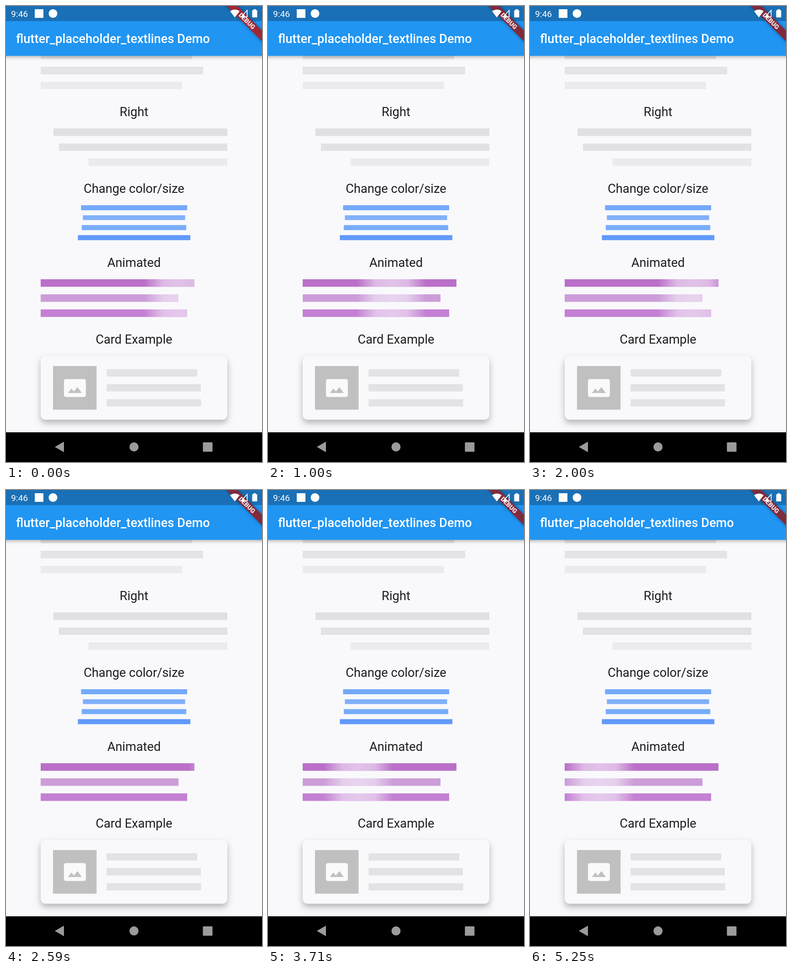
Write an HTML page with a canvas that moves like this. It is 561 by 998 pixels and loops after 5.29 s.

```html
<!DOCTYPE html>
<html lang="en">
<head>
<meta charset="utf-8">
<title>Placeholder lines demo</title>
<style>
html, body { margin: 0; width: 100%; height: 100%; overflow: hidden; background: #f9f9fc; }
canvas { display: block; }
</style>
</head>
<body>
<canvas id="stage" width="561" height="998"></canvas>
<script>
const ctx = document.getElementById('stage').getContext('2d');
const W = 561, H = 998, LOOP = 5290, FIRST = 90, STEP = 40;
const SWING = 2010, TURN = 1395;
const FONT = 'Roboto, sans-serif';

function bar(x1, x2, y1, y2, color) {
  ctx.fillStyle = color;
  ctx.fillRect(x1, y1, x2 - x1, y2 - y1);
}

function label(text, x, y, size, weight, color, align = 'left') {
  ctx.font = `${weight} ${size}px ${FONT}`;
  ctx.textAlign = align;
  ctx.textBaseline = 'alphabetic';
  ctx.fillStyle = color;
  ctx.fillText(text, x, y);
}

function heading(text, y) {
  label(text, 280.5, y, 27.3, 400, '#1e1e20', 'center');
}

function poly(color, ...points) {
  ctx.fillStyle = color;
  ctx.beginPath();
  points.forEach(([x, y]) => ctx.lineTo(x, y));
  ctx.closePath();
  ctx.fill();
}

function disc(x, y, r, color) {
  ctx.fillStyle = color;
  ctx.beginPath();
  ctx.arc(x, y, r, 0, 2 * Math.PI);
  ctx.fill();
}

function roundBox(x, y, w, h, r, color) {
  ctx.fillStyle = color;
  ctx.beginPath();
  ctx.roundRect(x, y, w, h, r);
  ctx.fill();
}

function shadow(color, blur, dy) {
  ctx.shadowColor = color;
  ctx.shadowBlur = blur;
  ctx.shadowOffsetY = dy;
}

// The highlight swings left and right with a sine ease.
function glowCenter(t) {
  const s = (1 - Math.cos(2 * Math.PI * (t - TURN) / SWING)) / 2;
  return 129 + 372 * s;
}

function lists() {
  bar(76, 407.5, 100, 116.5, '#e3e3e7');
  bar(76, 432, 133, 149.5, '#e4e4e7');
  bar(76, 386, 166, 182, '#ebebed');

  heading('Right', 241);
  bar(104, 485, 268, 284.5, '#e0e0e4');
  bar(116, 485, 301, 317, '#e2e2e5');
  bar(181, 485, 333.5, 350, '#ebebed');

  heading('Change color/size', 409);
  bar(164.5, 397, 436, 447, '#74a9fb');
  bar(168.5, 392.5, 458, 468.5, '#80b0fb');
  bar(166, 395, 479.5, 490.5, '#77acfa');
  bar(157.5, 404, 501.5, 512.5, '#6199fc');
}

function animated(t) {
  heading('Animated', 571);
  const c = glowCenter(t);
  const glow = ctx.createLinearGradient(c - 76, 0, c + 76, 0);
  [[0, 0], [0.27, 0.55], [0.5, 0.62], [0.73, 0.55], [1, 0]]
    .forEach(([at, a]) => glow.addColorStop(at, `rgba(250,246,252,${a})`));
  [[413, 598, '#ba6fc8'], [378, 631, '#cc9dd8'], [397, 664, '#c480d3']]
    .forEach(([right, y, color]) => {
      bar(76, right, y, y + 16.5, color);
      bar(76, right, y, y + 16.5, glow);
    });
}

function card() {
  heading('Card Example', 739);
  ctx.save();
  shadow('rgba(0,0,0,0.28)', 14, 7);
  roundBox(76, 766, 409, 139.5, 11, '#f9f9fc');
  ctx.restore();

  bar(103, 198.5, 788, 883.5, '#c0c0c1');
  roundBox(127, 816.5, 48, 39.3, 4.5, '#fafafb');
  poly('#c0c0c1', [135.7, 847], [143.3, 837.2], [148.8, 843.8], [156.4, 834], [166.2, 847]);

  bar(220.5, 419, 795, 811, '#e3e3e6');
  bar(220.5, 427, 827.5, 843.5, '#e2e2e4');
  bar(220.5, 427.5, 860.5, 876.5, '#e3e3e6');
}

function appBar() {
  ctx.save();
  shadow('rgba(0,0,0,0.35)', 8, 2);
  bar(-10, W + 10, 33, 109, '#2095f2');
  ctx.restore();
  bar(0, W, 0, 33, '#1a70b6');
  label('flutter_placeholder_textlines Demo', 22, 81, 27.3, 500, '#fff');
}

function banner(t) {
  ctx.save();
  ctx.translate(W, 0);
  ctx.rotate(Math.PI / 4);
  shadow('rgba(0,0,0,0.4)', 7, 0);
  bar(-70, 70, 38.2, 54.6, t < FIRST ? '#a22736' : '#822a3d');
  ctx.shadowColor = 'transparent';
  label('DEBUG', 0, 51.4, 13.9, 900, '#f3e9ec', 'center');
  ctx.restore();
}

function statusIcons() {
  label('9:46', 11, 23.5, 19.2, 400, '#fff');
  bar(63, 82, 7, 26, '#fff');
  disc(103, 16.5, 9.5, '#fff');

  ctx.fillStyle = '#fff';
  ctx.beginPath();
  ctx.moveTo(501.5, 25);
  ctx.lineTo(491, 11.5);
  ctx.quadraticCurveTo(501.5, 4, 512, 11.5);
  ctx.closePath();
  ctx.fill();

  ctx.strokeStyle = '#fff';
  ctx.lineWidth = 1.8;
  ctx.beginPath();
  ctx.moveTo(515, 24);
  ctx.lineTo(528.5, 24);
  ctx.lineTo(528.5, 9.5);
  ctx.closePath();
  ctx.stroke();
  poly('#fff', [514, 25], [522, 16.5], [522, 25]);

  roundBox(539.5, 9, 11, 16, 1.5, '#fff');
  bar(542.5, 547.5, 7, 10, '#fff');
}

function navBar() {
  const gray = '#9b9b9b';
  bar(0, W, 933, H, '#000');
  poly(gray, [107, 965], [127, 953.5], [127, 976.5]);
  disc(280.5, 965, 10, gray);
  roundBox(431.5, 955, 21, 20.5, 1.5, gray);
}

function draw(t) {
  bar(0, W, 0, H, '#f9f9fc');
  lists();
  animated(t);
  card();
  appBar();
  banner(t);
  statusIcons();
  navBar();
}

const start = performance.now();
function tick() {
  const t = Math.max(0, performance.now() - start) % LOOP;
  draw(t < FIRST ? 0 : FIRST + Math.floor((t - FIRST) / STEP) * STEP);
  requestAnimationFrame(tick);
}
tick();
</script>
</body>
</html>
```
